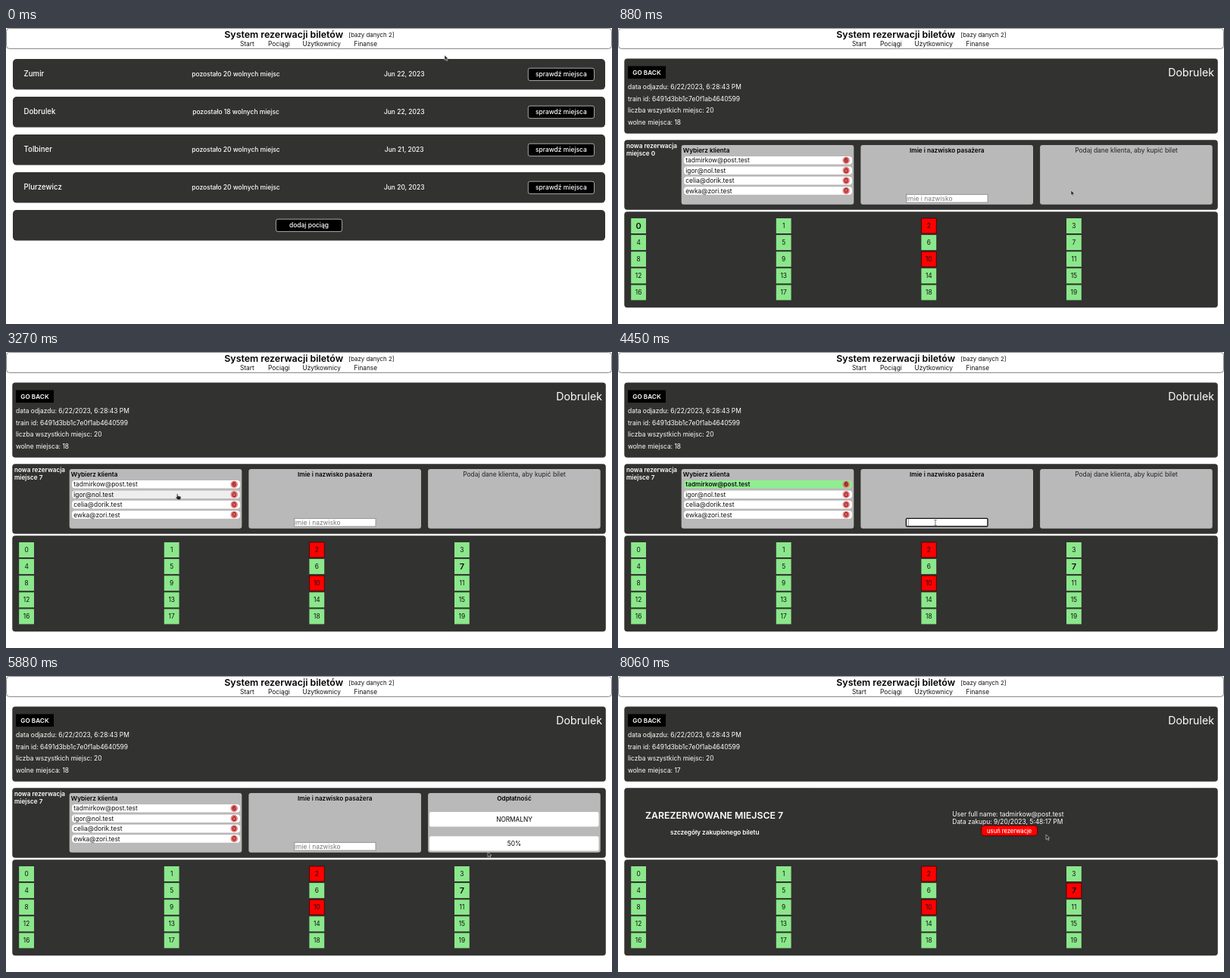
Write an HTML page that moves like this. It is 800 by 392 pixels and loops after 8120 ms.

```html
<!DOCTYPE html>
<html lang="pl">
<head>
<meta charset="utf-8">
<title>System rezerwacji biletów</title>
<style>
html, body { margin: 0; width: 100%; height: 100%; overflow: hidden; background: #fff; }
svg { display: block; width: 100%; height: 100%; font-family: Inter, "Open Sans", sans-serif; white-space: pre; cursor: default; }
</style>
</head>
<body>
<svg viewBox="0 0 800 392"><g id="page"></g><g id="cursor"></g></svg>
<script>
const LOOP = 8120;
const DARK = '#323230', GREEN = '#8be78b', TRAIN = 'Dobrulek';
const trains = [['Zumir', 20, 22], [TRAIN, 18, 22], ['Tolbiner', 20, 21], ['Plurzewicz', 20, 20]];
const clients = ['tadmirkow@post.test', 'igor@nol.test', 'celia@dorik.test', 'ewka@zori.test'];
const passenger = 'Iga Morwin';

// Moments when the state changes
const OPEN = 700, SEAT5 = 1560, SEAT7 = 2640, CLIENT = 3600, FOCUS = 4330,
      TYPE = 4550, RESUME = 4940, PAY = 5740, BOUGHT = 6230;

// Pointer stops: time, x, y
const stops = [
  [120, 579, 36], [610, 719, 110], [670, 719, 110], [880, 598, 215], [1500, 220, 285], [1730, 220, 285],
  [2120, 350, 338], [2210, 350, 338], [2600, 602, 285], [2720, 602, 285], [3270, 226, 188], [3330, 226, 188],
  [3540, 205, 176], [3680, 205, 176], [4210, 419, 226], [5000, 419, 226], [5640, 668, 224], [5740, 668, 224],
  [5880, 636, 233], [5940, 636, 233], [6600, 601, 222], [7390, 577, 224], [8000, 565, 210]
];

const glyphs = {
  arrow: '<path d="M0 0V6.6L1.6 5.2 2.7 7.6 3.8 7.1 2.7 4.8 4.8 4.7Z" fill="#222" stroke="#ddd" stroke-width=".6"/>',
  hand: '<path d="M-.6.2Q.2-.8.9.2V2.6L4.4 3.3Q5.2 3.6 5 4.6L4.4 7.8H.5L-2 4.7Q-1.9 3.6-.6 4.4Z" fill="#222" stroke="#ddd" stroke-width=".6"/>',
  beam: '<path d="M-1.6-3.5H-.4L0-3 .4-3.5H1.6M0-3V3M-1.6 3.5H-.4L0 3 .4 3.5H1.6" fill="none" stroke="#444" stroke-width=".7"/>'
};

const rect = (x, y, w, h, fill, r = 0, stroke = 'none', sw = 1) =>
  `<rect x="${x}" y="${y}" width="${w}" height="${h}" rx="${r}" fill="${fill}" stroke="${stroke}" stroke-width="${sw}"/>`;
const text = (x, y, str, { size = 8.45, weight = 400, fill = '#fff', at = 'start' } = {}) =>
  `<text x="${x}" y="${y}" font-size="${size}" font-weight="${weight}" fill="${fill}" text-anchor="${at}">${str}</text>`;
const bold = (x, y, str, opt) => text(x, y, str, { size: 8.2, weight: 600, ...opt });
const button = (x, y, w, label, color = '#fff', edge = '#ccc') =>
  rect(x, y, w, 16.4, '#000', 2.5, edge, .8) +
  text(x + w / 2, y + 11.2, label, { weight: 500, fill: color, at: 'middle' });
const inside = (p, x, y, w, h) => p.x >= x && p.x <= x + w && p.y >= y && p.y <= y + h;

function pointer(t) {
  const i = stops.findIndex(s => s[0] > t);
  const [ta, xa, ya] = stops[i < 0 ? stops.length - 1 : Math.max(0, i - 1)];
  if (i < 1) return { x: xa, y: ya };
  const [tb, xb, yb] = stops[i];
  const u = (t - ta) / (tb - ta), e = u * u * (3 - 2 * u);
  return { x: xa + (xb - xa) * e, y: ya + (yb - ya) * e };
}

function header() {
  const black = { fill: '#111' };
  return rect(.5, .4, 799, 27, '#fff', 4, '#777', .9) +
    bold(288.3, 13.3, 'System rezerwacji biletów', { size: 12.4, fill: '#000' }) +
    text(452.3, 12, '[bazy danych 2]', { size: 7.9, ...black }) +
    [[309, 'Start'], [346, 'Pociągi'], [391.5, 'Użytkownicy'], [459.5, 'Finanse']]
      .map(([x, label]) => text(x, 24.3, label, { size: 8.3, ...black })).join('');
}

function trainList(p) {
  let out = '';
  trains.forEach(([name, free, day], i) => {
    const y = 41 + 50 * i, over = inside(p, 9, y, 782, 41), hot = inside(p, 689, y + 12, 88, 17);
    const ink = { weight: 500, fill: over ? '#000' : '#fff' };
    if (hot) p.kind = 'hand';
    out += rect(9, y, 782, 40.6, over ? '#878786' : DARK, 5, over ? '#222' : 'none', .9) +
      text(23.5, y + 23.4, name, { ...ink, size: 9.7 }) +
      text(303.5, y + 23.3, `pozostało ${free} wolnych miejsc`, { ...ink, at: 'middle' }) +
      text(525.7, y + 23.3, `Jun ${day}, 2023`, { ...ink, at: 'middle' }) +
      button(689.3, y + 12.2, 87.2, 'sprawdź miejsca', hot ? '#ee5a52' : '#fff', hot ? '#7a2a2a' : '#ccc');
  });
  return out + rect(9, 241, 782, 40.6, DARK, 5) + button(356.4, 253.2, 87.2, 'dodaj pociąg');
}

function summary(t) {
  const lines = ['data odjazdu: 6/22/2023, 6:28:43 PM', 'train id: 6491d3bb1c7e0f1ab4640599',
    'liczba wszystkich miejsc: 20', `wolne miejsca: ${t < BOUGHT ? 18 : 17}`];
  return rect(8.3, 40.4, 783.5, 99.4, DARK, 4) + rect(13, 50.5, 50, 16.6, '#000') +
    bold(38, 61.9, 'GO BACK', { at: 'middle' }) +
    lines.map((s, i) => text(13, 81 + 15.6 * i, s)).join('') +
    text(787, 64, TRAIN, { size: 14.2, at: 'end' });
}

function clientList(t, p) {
  let out = bold(85.8, 165.4, 'Wybierz klienta', { fill: '#000' });
  clients.forEach((mail, i) => {
    const y = 170 + 13.4 * i, over = inside(p, 87, y, 222, 10.6);
    const chosen = !i && t >= CLIENT && t < PAY;
    if (over) p.kind = 'hand';
    out += rect(87, y, 222, 10.6, chosen ? '#8fee8f' : over ? '#eee' : '#fff', 4) +
      text(89.3, y + 8.3, mail, { fill: '#111', ...(chosen && { size: 8.2, weight: 600 }) }) +
      `<circle cx="301.2" cy="${y + 5.3}" r="4.6" fill="#f06a6a"/>` +
      text(301.2, y + 8.2, i ? 0 : 6, { size: 8, weight: chosen ? 600 : 400, fill: '#311', at: 'middle' });
  });
  return out;
}

function typed(t) {
  if (t < TYPE || t >= PAY) return '';
  const n = t < RESUME ? Math.min(3, 1 + (t - TYPE) / 65) : 4 + (t - RESUME) / 66;
  return passenger.slice(0, Math.floor(n));
}

function nameInput(t, p) {
  const focused = t >= FOCUS && t < PAY, value = typed(t);
  if (inside(p, 380, 220, 108, 11.5)) p.kind = 'beam';
  return bold(434.3, 165.4, 'Imie i nazwisko pasażera', { fill: '#000', at: 'middle' }) +
    rect(380.4, 220.4, 107.6, 10.6, '#fff', focused ? 1.2 : 0, focused ? '#111' : '#888', focused ? 1.4 : .8) +
    (focused
      ? text(382, 228.8, value + '<tspan fill="#444" font-weight="300">|</tspan>', { fill: '#000' })
      : text(381, 228.8, 'imie i nazwisko', { fill: '#777' }));
}

function payment(t, p) {
  if (t < TYPE)
    return text(671, 165.4, 'Podaj dane klienta, aby kupić bilet', { fill: '#222', at: 'middle' });
  return bold(671, 165.4, 'Odpłatność', { fill: '#000', at: 'middle' }) +
    ['NORMALNY', '50%'].map((label, i) => {
      const y = 180 + 32.2 * i, over = inside(p, 559, y, 223, 19.4);
      if (over) p.kind = 'hand';
      return rect(559, y, 223.5, 19.4, over ? '#eee' : '#fff', 2) +
        text(671, y + 12.8, label, { size: 8.3, fill: '#000', at: 'middle' });
    }).join('');
}

function booking(t, p, seat) {
  return bold(11, 158.5, 'nowa rezerwacja') + bold(11, 168.5, `miejsce ${seat}`) +
    [83.7, 320.4, 557.1].map(x => rect(x, 155, 227.6, 78.8, '#b9b9b9', 3)).join('') +
    clientList(t, p) + nameInput(t, p) + payment(t, p);
}

function ticket() {
  return bold(36, 189, 'ZAREZERWOWANE MIEJSCE 7', { size: 12.3 }) +
    bold(127.7, 210, 'szczegóły zakupionego biletu', { at: 'middle' }) +
    text(441.3, 186, `User full name: ${clients[0]}`) +
    text(441.3, 196, 'Data zakupu: 9/20/2023, 5:48:17 PM') +
    rect(479.6, 198, 74, 13.6, '#f00', 4, '#400', .8) +
    text(516.7, 207.5, 'usuń rezerwacje', { size: 7.5, weight: 500, at: 'middle' });
}

function seats(t, p, seat) {
  let out = rect(8.3, 243.3, 783.5, 127, DARK, 4);
  for (let i = 0; i < 20; i++) {
    const x = 17.2 + 191.6 * (i % 4), y = 252 + 22.1 * Math.floor(i / 4);
    const taken = i === 2 || i === 10 || (i === 7 && t >= BOUGHT), chosen = i === seat;
    if (inside(p, x, y, 20, 20)) p.kind = 'hand';
    out += rect(x, y, 19.8, 20, taken ? '#f00' : GREEN, 0, taken ? '#400' : 'none', .8) +
      text(x + 9.9, y + (chosen ? 14 : 13), i,
        { size: chosen ? 11 : 8.4, weight: chosen ? 600 : 400, fill: '#111', at: 'middle' });
  }
  return out;
}

function trainPage(t, p) {
  const seat = t < SEAT5 ? 0 : t < SEAT7 ? 5 : 7;
  return summary(t) + rect(8.3, 148.2, 783.5, 92.6, DARK, 4) +
    (t < BOUGHT ? booking(t, p, seat) : ticket()) + seats(t, p, seat);
}

const page = document.getElementById('page'), cursor = document.getElementById('cursor');
let shown = '';

function draw() {
  const t = performance.now() % LOOP, p = pointer(t);
  p.kind = 'arrow';
  const view = header() + (t < OPEN ? trainList(p) : trainPage(t, p));
  if (view !== shown) page.innerHTML = shown = view;
  cursor.innerHTML = glyphs[p.kind];
  cursor.setAttribute('transform', `translate(${p.x.toFixed(1)} ${p.y.toFixed(1)})`);
  requestAnimationFrame(draw);
}
draw();
</script>
</body>
</html>
```
